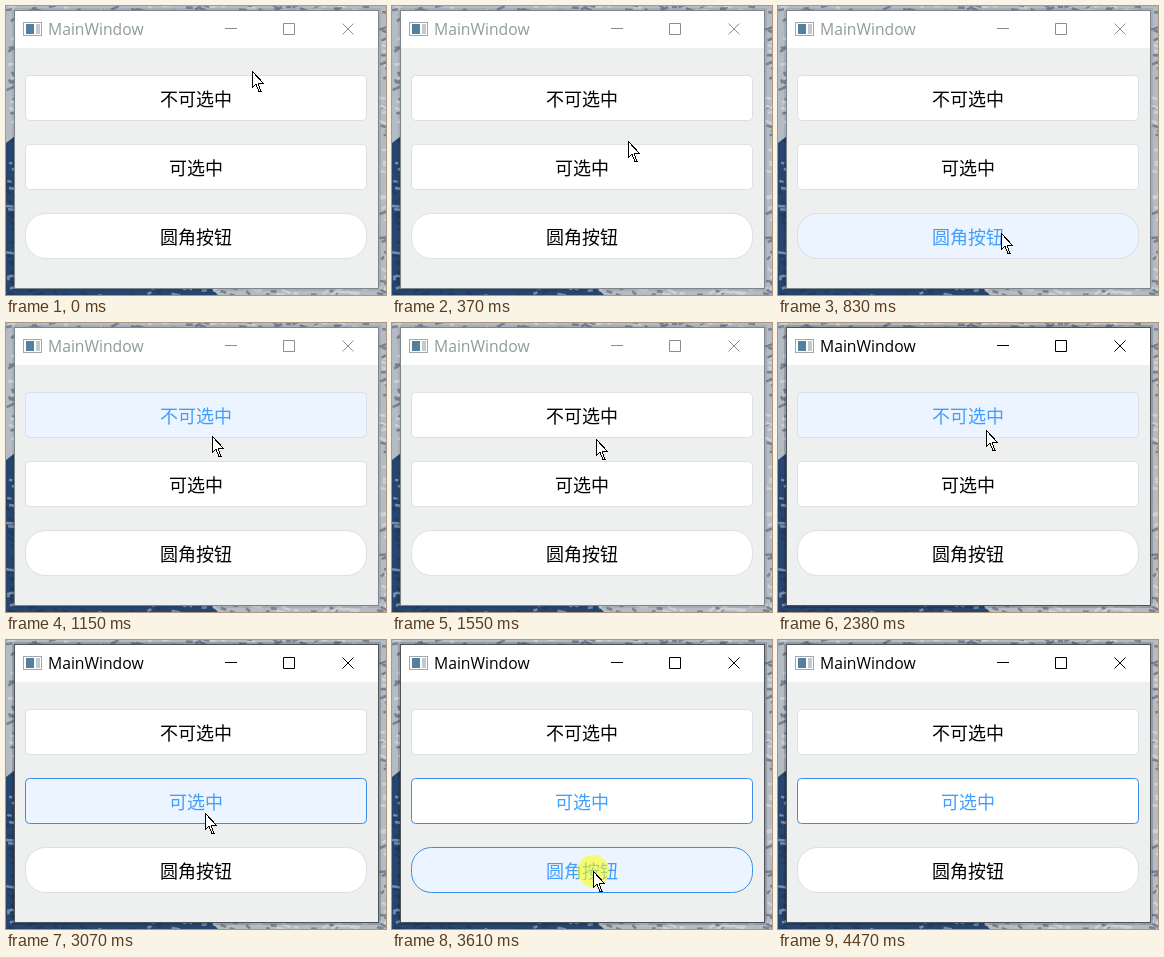
An HTML page for the animation above (4850 ms loop, 380 by 289 pixels).

```html
<!DOCTYPE html>
<html lang="zh-CN">
<head>
<meta charset="utf-8">
<title>MainWindow</title>
<style>
  html, body { margin: 0; width: 100%; height: 100%; overflow: hidden; }
  svg { display: block; width: 380px; height: 289px; }
  .title { font: 15.7px "Open Sans", "Noto Sans", sans-serif; fill: #8f9c9a; }
  .controls { fill: none; stroke: #8d8d8d; }
  .frame { fill: #eef0f0; stroke: #7d858c; }
  .shadow { fill: none; stroke: #101820; stroke-width: 2; opacity: .08; }
  .active .title { fill: #000; }
  .active .controls { stroke: #000; }
  .active .frame { stroke: #4d5358; }
  .active .shadow { opacity: .2; }
  .button rect { fill: #fff; stroke: #dcdfe3; }
  .button text { font: 350 18px "Noto Sans CJK SC", "Noto Sans CJK", sans-serif; text-anchor: middle; fill: #000; }
  .button.hover rect { fill: #ecf4ff; }
  .button.hover text, .button.on text { fill: #409eff; }
  .button.on rect { stroke: #3a8ee6; }
</style>
</head>
<body>
<svg viewBox="0 0 380 289">
  <rect width="380" height="289" fill="#b4bbc3"/>
  <path d="M0 137L9 130V282H205L212 289H0Z" fill="#26456f"/>
  <g id="rocks" stroke-width="2.500" opacity=".4"></g>

  <g id="window">
    <rect class="shadow" x="7" y="3" width="367" height="281"/>
    <rect class="frame" x="8.500" y="4.500" width="364" height="278"/>
    <rect x="9" y="5" width="363" height="37" fill="#fff"/>
    <rect x="17.500" y="16.500" width="18" height="13" fill="#fff" stroke="#a0a8ad"/>
    <rect x="20" y="18" width="8" height="10" fill="#547f9d"/>
    <rect x="30" y="18" width="4" height="10" fill="#c0cad0"/>
    <text class="title" x="42" y="29">MainWindow</text>
    <path class="controls" d="M219 22.500H231M277.500 17.500H288.500V28.500H277.500ZM336.500 17.500L347.500 28.500M347.500 17.500L336.500 28.500"/>
    <g id="buttons"></g>
  </g>

  <g id="pointer">
    <circle id="press" r="16" fill="#ff0" opacity=".55"/>
    <path d="M.5 .5V16.500L4 13.200L7 20.500H9L6.300 12.500H11.500Z" fill="#fff" stroke="#000" shape-rendering="crispEdges"/>
  </g>
</svg>
<script>
const LOOP = 4850, DELAY = 50, STEP = 77.3;   // ms

// Pointer stops: step, x, y
const stops = [
  [-1, 246, 65], [10, 223, 227], [13, 207, 108], [17, 202, 141], [19, 204, 116],
  [28, 209, 93], [30, 208, 107], [34, 202, 161], [37, 202, 161], [39, 199, 173],
  [46, 201, 231], [53, 201, 234], [57, 202, 300]
];
const clicks = [27, 36, 46, 49, 52];
const [ACTIVATED, CHECKED] = clicks;
const GONE = 57;

const byId = id => document.getElementById(id);
const add = (parent, markup) => {
  parent.insertAdjacentHTML('beforeend', markup);
  return parent.lastElementChild;
};

// Snow and rock flecks around the window
let seed = 7;
const random = () => (seed = seed * 16807 % 2147483647) / 2147483647;
for (let i = 0; i < 200; i++) {
  const along = random(), far = random() < .5, depth = random() * 7;
  const [x, y] = i % 2 ? [along * 380, far ? 282 + depth : depth - 2] : [far ? 373 + depth : depth, along * 289];
  const shade = random() < .5 ? '#f4f6f8' : '#1c2f4a';
  add(byId('rocks'), `<path d="M${x} ${y}l${3 + random() * 6} ${random() * 8 - 4}" stroke="${shade}"/>`);
}

const buttons = [['不可选中', 4], ['可选中', 4], ['圆角按钮', 20]].map(([label, radius], i) => {
  const top = 69 + i * 69;
  const node = add(byId('buttons'), `<g class="button">
    <rect x="19.5" y="${top + .5}" width="341" height="45" rx="${radius}"/>
    <text x="190" y="${top + 30.6}">${label}</text></g>`);
  return { top, node };
});

function pointerAt(step) {
  const next = Math.max(1, stops.findIndex(stop => stop[0] >= step));
  const [from, x0, y0] = stops[next - 1], [to, x1, y1] = stops[next];
  const u = (step - from) / (to - from);
  const eased = u * u * (3 - 2 * u);
  return [Math.round(x0 + (x1 - x0) * eased), Math.round(y0 + (y1 - y0) * eased)];
}

function draw(step) {
  const visible = step < GONE;
  const [x, y] = pointerAt(Math.min(step, GONE));
  const pressed = clicks.includes(step);

  byId('window').classList.toggle('active', step >= ACTIVATED);
  buttons.forEach(({ top, node }, i) => {
    const hover = visible && y >= top && y < top + 46;
    node.classList.toggle('hover', hover);
    node.classList.toggle('on', hover && pressed || i === 1 && step >= CHECKED);
  });
  byId('pointer').setAttribute('transform', `translate(${x} ${y})`);
  byId('pointer').style.display = visible ? '' : 'none';
  byId('press').style.display = pressed ? '' : 'none';
}

const start = performance.now();
function play() {
  const time = (performance.now() - start) % LOOP;
  draw(Math.floor((time - DELAY) / STEP));
  requestAnimationFrame(play);
}
play();
</script>
</body>
</html>
```
